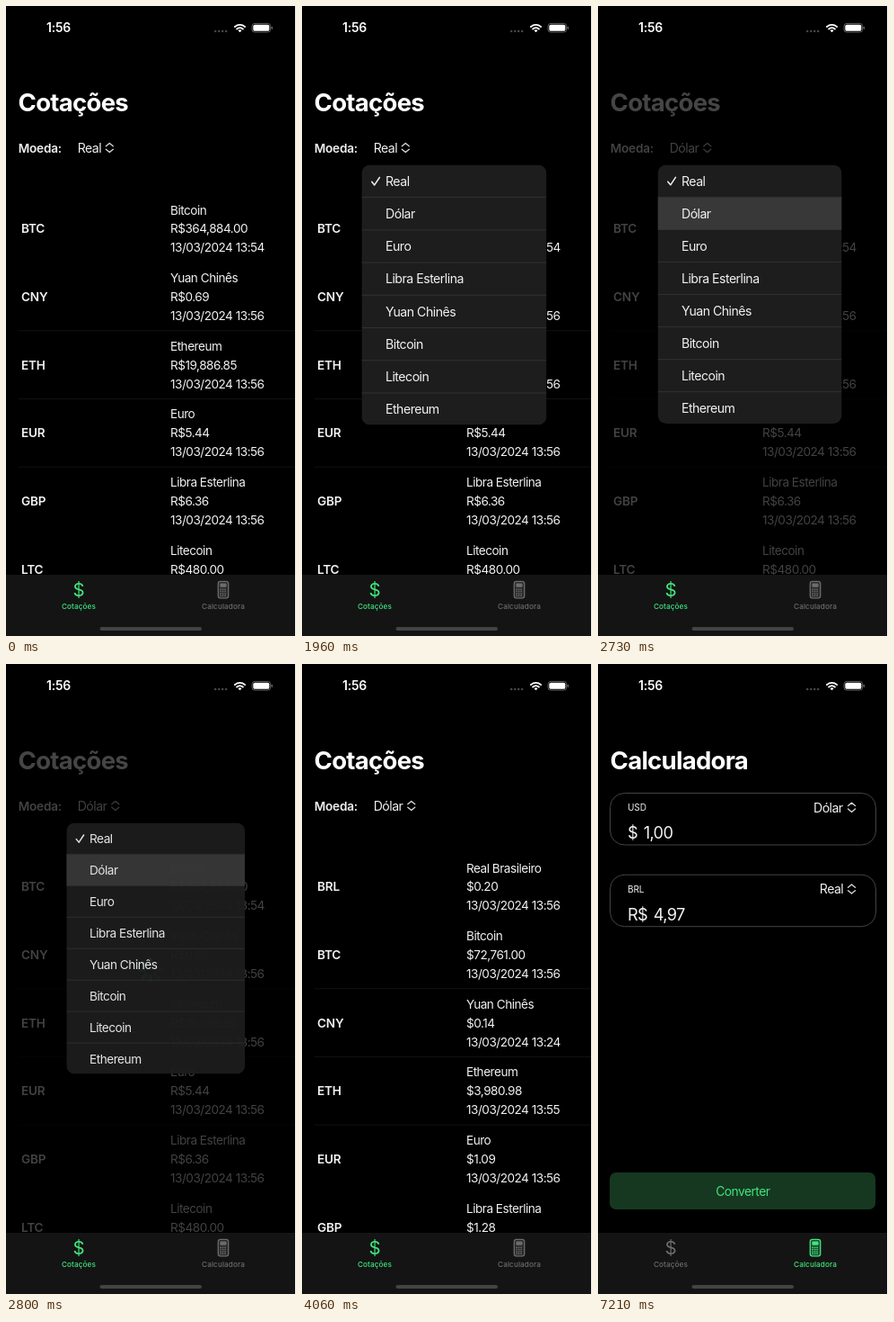
An HTML page for the animation above (8000 ms loop, 323 by 700 pixels).

```html
<!DOCTYPE html>
<html lang="pt-BR">
<head>
<meta charset="utf-8">
<title>Cotações</title>
<style>
  html, body { margin: 0; width: 100%; height: 100%; overflow: hidden; background: #000; }
  svg { display: block; width: 323px; height: 700px; font-family: Inter, "Liberation Sans", sans-serif; }
  text { fill: #f2f2f2; letter-spacing: -.037em; white-space: pre; }
  .title { font-size: 27.5px; font-weight: 700; letter-spacing: -.026em; fill: #fff; }
  .strong { font-size: 13.6px; font-weight: 600; letter-spacing: -.015em; }
  .row { font-size: 13.6px; }
  .pick { font-size: 14.1px; }
  .unit { font-size: 10px; letter-spacing: -.01em; }
  .amount { font-size: 18.2px; letter-spacing: -.035em; word-spacing: .12em; }
  .tab text { fill: currentColor; font-size: 8.2px; font-weight: 500; letter-spacing: .01em; text-anchor: middle; }
  .tab .sign { font-size: 20.5px; font-weight: 400; }
  .line { fill: none; stroke-linecap: round; stroke-linejoin: round; }
</style>
</head>
<body>
<svg id="stage" viewBox="0 0 323 700"></svg>
<script>
const LOOP = 8000, TICK = 70;
const GREEN = '#40e67e', GRAY = '#6c6c6c';
const SELECT = 2660, LOADING = 2730, LOADED = 3360, CALCULATOR = 6370;

// Menu steps: time, scale, visible share of the height, opacity
const MENU_STEPS = [
  [0, 0, 0, 0],
  [1750, .3, .25, .12], [1820, .61, .585, .5], [1890, .88, .88, .86],
  [1960, 1.005, 1, 1], [2030, 1.012, 1, 1], [2100, 1.007, 1, 1],
  [2170, 1.003, 1, 1], [2240, 1, 1, 1],
  [2800, .97, 1, .95], [2870, .85, .82, .75], [2940, .6, .56, .4],
  [3010, .4, .35, .15], [3080, 0, 0, 0]
];
const MENU = { x: 66.5, y: 176.5, w: 205, h: 287.5, pitch: 36.05, pivot: 94 };
const COINS = ['Real', 'Dólar', 'Euro', 'Libra Esterlina', 'Yuan Chinês', 'Bitcoin', 'Litecoin', 'Ethereum'];

const IN_REAL = [
  ['BTC', 'Bitcoin', 'R$364,884.00', '13:54'],
  ['CNY', 'Yuan Chinês', 'R$0.69', '13:56'],
  ['ETH', 'Ethereum', 'R$19,886.85', '13:56'],
  ['EUR', 'Euro', 'R$5.44', '13:56'],
  ['GBP', 'Libra Esterlina', 'R$6.36', '13:56'],
  ['LTC', 'Litecoin', 'R$480.00', '13:56']
];
const IN_DOLLAR = [
  ['BRL', 'Real Brasileiro', '$0.20', '13:56'],
  ['BTC', 'Bitcoin', '$72,761.00', '13:56'],
  ['CNY', 'Yuan Chinês', '$0.14', '13:24'],
  ['ETH', 'Ethereum', '$3,980.98', '13:55'],
  ['EUR', 'Euro', '$1.09', '13:56'],
  ['GBP', 'Libra Esterlina', '$1.28', '13:56']
];

const text = (x, y, cls, value, more = '') => `<text x="${x}" y="${y}" class="${cls}" ${more}>${value}</text>`;
const rect = (x, y, w, h, r, more) => `<rect x="${x}" y="${y}" width="${w}" height="${h}" rx="${r}" ${more}/>`;
const path = (d, color, width) => `<path class="line" d="${d}" stroke="${color}" stroke-width="${width}"/>`;
const group = (id, body) => `<g id="${id}">${body}</g>`;
const repeat = (n, draw) => Array.from({ length: n }, (_, i) => draw(i)).join('');

const chevrons = (x, y) => path(`M${x - 4} ${y - 1.7}l4 -3.4l4 3.4M${x - 4} ${y + 1.7}l4 3.4l4 -3.4`, '#dcdcdc', 1.25);

function quotes(id, rows) {
  const lines = rows.map(([code, name, price, hour], i) => {
    const y = 231.5 + i * 75.65;
    return text(17, y + 20.9, 'strong', code) + text(183, y, 'row', name) +
      text(183, y + 20.9, 'row', price) + text(183, y + 41.8, 'row', '13/03/2024 ' + hour);
  }).join('');
  return group(id, lines);
}

function card(y, unit, amount, coin, coinX) {
  return rect(13.5, y + .5, 296, 57.5, 16, 'fill="none" stroke="#444"') +
    text(33, y + 20, 'unit', unit) + text(33, y + 51, 'amount', amount) +
    text(coinX, y + 21.5, 'pick', coin) + chevrons(282.5, y + 16.3);
}

function statusBar() {
  const dots = repeat(4, i => `<circle cx="${233.2 + i * 4}" cy="28" r="1.25" fill="#484848"/>`);
  const wifi = path('M254.9 23.1a8.2 8.2 0 0 1 11.2 0M257.2 25.5a4.9 4.9 0 0 1 6.6 0', '#fff', 1.9) +
    '<path d="M260.5 29.3l-2 -2.1a2.9 2.9 0 0 1 4 0z" fill="#fff"/>';
  const battery = rect(274, 19.4, 20.6, 9.7, 3, 'fill="none" stroke="#777" stroke-width=".8"') +
    rect(275.3, 20.7, 18, 7.1, 1.9, 'fill="#fff"') + rect(295.6, 22.7, 1.2, 3.2, .6, 'fill="#777"');
  return text(45, 29.3, 'strong', '1:56', 'style="font-size:14px;fill:#fff"') + dots + wifi + battery;
}

function tabBar() {
  const keys = repeat(12, i =>
    rect(238.3 + i % 3 * 2.5, 647.4 + (i / 3 | 0) * 2.4, 1.6, 1.5, .5, 'fill="currentColor"'));
  const phone = rect(236.3, 639.4, 11.4, 18.4, 2.4,
    'fill="currentColor" fill-opacity=".25" stroke="currentColor" stroke-width="1.3"') +
    rect(238.4, 641.6, 7.2, 4.2, .8, 'fill="currentColor"') + keys;
  return rect(0, 632, 323, 68, 0, 'fill="#141414"') +
    `<g id="tabQuotes" class="tab">${text(81.3, 656, 'sign', '$')}${text(81, 669.7, '', 'Cotações')}</g>` +
    `<g id="tabCalc" class="tab">${phone}${text(242, 669.7, '', 'Calculadora')}</g>` +
    rect(104.5, 690, 113.5, 4, 2, 'fill="#444"');
}

function menu() {
  const { x, y, w, h, pitch } = MENU;
  const items = COINS.map((coin, i) => text(93, y + i * pitch + 23, 'pick', coin)).join('');
  const rules = repeat(7, i => rect(x, y + (i + 1) * pitch - .6, w, .9, 0, 'fill="#333"'));
  return `<clipPath id="cut">${rect(x, y, w, h, 9.5, 'id="cutBox"')}</clipPath>` +
    `<g id="menu"><g clip-path="url(#cut)">${rect(x, y, w, h, 0, 'fill="#1d1d1d"')}` +
    rect(x, y + pitch, w, pitch, 0, 'id="chosen" fill="#383838"') + rules + items +
    path('M77.8 195.2l3 3.6l5.6 -8.4', '#f2f2f2', 1.5) + '</g></g>';
}

const spinner = () => group('spinner', repeat(8, i =>
  `<line x1="161" x2="161" y1="327.9" y2="333" stroke="${GREEN}" stroke-width="4" stroke-linecap="round" transform="rotate(${i * 45} 161 340)"/>`));

const quotesPage = text(13.5, 117.3, 'title', 'Cotações') + text(13.7, 163, 'strong', 'Moeda:') +
  group('labelReal', text(79.7, 163, 'pick', 'Real') + chevrons(115.3, 157.5)) +
  group('labelDollar', text(79.7, 163, 'pick', 'Dólar') + chevrons(121.8, 157.5)) +
  repeat(3, i => rect(14, 360.4 + i * 75.65, 309, .8, 0, 'fill="#161616"')) +
  quotes('inReal', IN_REAL) + quotes('inDollar', IN_DOLLAR);

const calcPage = text(13.5, 117.3, 'title', 'Calculadora') +
  card(143, 'USD', '$ 1,00', 'Dólar', 240) + card(233.7, 'BRL', 'R$ 4,97', 'Real', 246.8) +
  rect(13, 565, 296, 41, 7, 'fill="#163820"') +
  text(161.3, 590.8, 'pick', 'Converter', `text-anchor="middle" style="fill:${GREEN};font-size:13.8px"`);

const rightEdge = rect(322, 0, 1, 700, 0, 'fill="#fff"');

document.getElementById('stage').innerHTML = rect(0, 0, 323, 700, 0, 'fill="#000"') +
  group('quotesPage', quotesPage) + group('calcPage', calcPage) +
  spinner() + tabBar() + menu() + statusBar() + rightEdge;

const el = id => document.getElementById(id);
const show = (id, on) => el(id).setAttribute('visibility', on ? 'inherit' : 'hidden');
const spokes = [...el('spinner').children];

function poseMenu(t) {
  const [, scale, part, opacity] = MENU_STEPS.filter(step => step[0] <= t).pop();
  const { y, h, pivot } = MENU;
  el('menu').setAttribute('transform', `translate(${pivot} ${y}) scale(${scale}) translate(${-pivot} ${-y})`);
  el('menu').setAttribute('opacity', opacity);
  el('cutBox').setAttribute('height', h * part);
  show('menu', opacity > 0);
  show('chosen', t >= SELECT);
}

function poseSpinner(t) {
  const head = Math.floor((t - 3290) / 125) + 4;
  spokes.forEach((spoke, i) => {
    const age = (head - i + 16) % 8;
    spoke.setAttribute('opacity', Math.max(.22, 1 - age * .14));
  });
}

function draw(now) {
  const t = Math.floor(now % LOOP / TICK) * TICK;
  const loading = t >= LOADING && t < LOADED;
  const calc = t >= CALCULATOR;
  show('quotesPage', !calc);
  show('calcPage', calc);
  show('labelReal', t < LOADING);
  show('labelDollar', t >= LOADING);
  show('inReal', t < LOADED);
  show('inDollar', t >= LOADED);
  show('spinner', loading);
  el('quotesPage').setAttribute('opacity', loading ? .27 : 1);
  el('tabQuotes').setAttribute('color', calc ? GRAY : GREEN);
  el('tabCalc').setAttribute('color', calc ? GREEN : GRAY);
  poseMenu(t);
  poseSpinner(t);
}

const start = performance.now();
function frame() {
  draw(performance.now() - start);
  requestAnimationFrame(frame);
}
frame();
</script>
</body>
</html>
```
